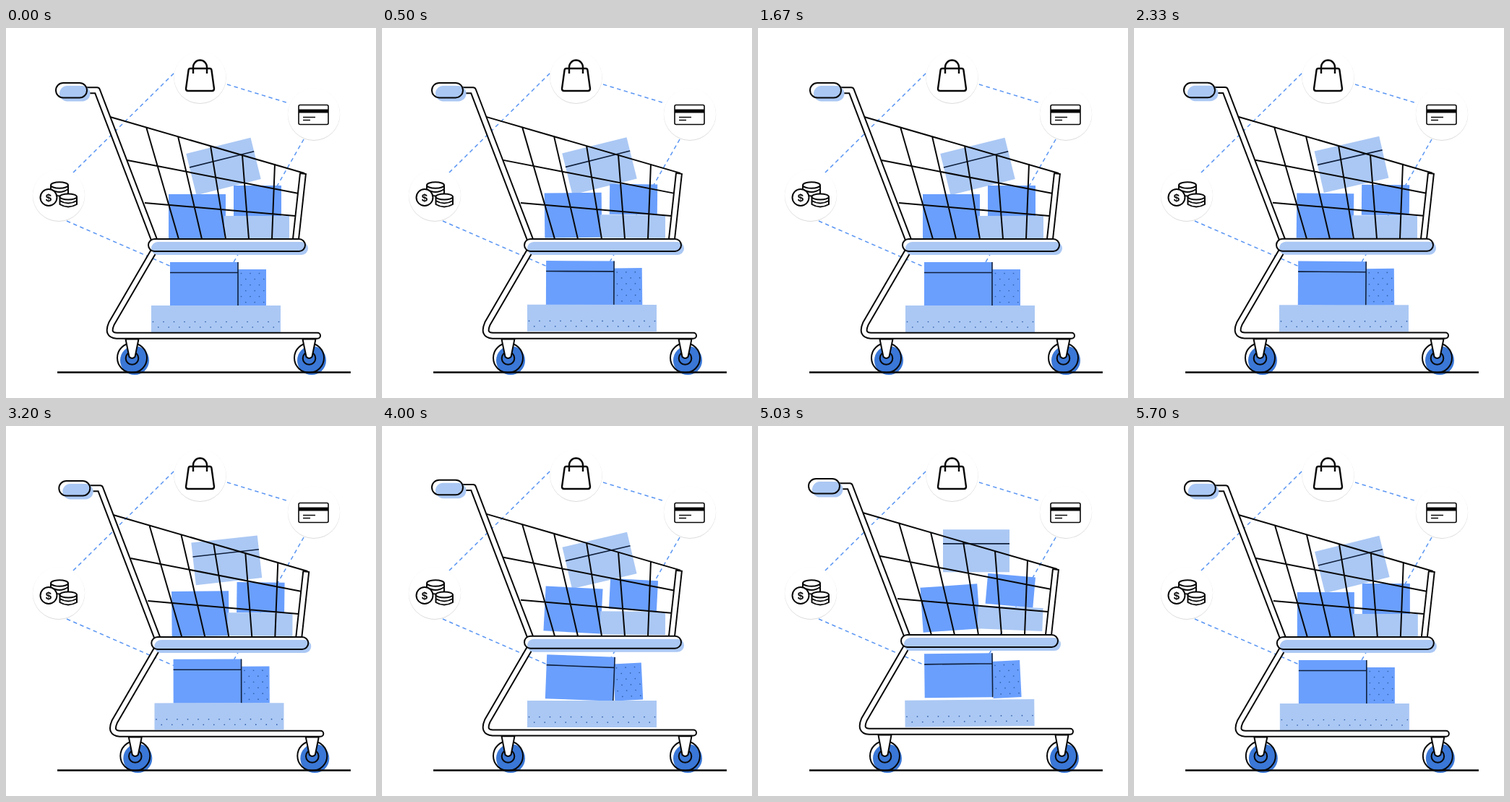
Recreate the animation shown at these times as an HTML page. Size 512 by 512 pixels, loop 5.73 s.

```html
<!DOCTYPE html>
<html lang="en">
<head>
<meta charset="utf-8">
<title>Shopping cart</title>
<style>
  html, body { margin: 0; width: 100%; height: 100%; overflow: hidden; background: #fff; }
  svg { display: block; width: 100vw; height: 100vh; fill: none; stroke-linejoin: round; }
  .ink { stroke: #080808; stroke-width: 2; }
  .thin { stroke: #10203c; stroke-width: 1.6; }
  .dots { stroke: #2f5fa8; stroke-width: 1.7; stroke-linecap: round; }
  .light { fill: #abc8f4; }
  .mid { fill: #6a9ffd; }
  .dark { fill: #3a77d6; }
  .white { fill: #fff; }
  .outer { stroke: #080808; stroke-width: 10; }
  .inner { stroke: #fff; stroke-width: 6; }
  .dash { stroke: #5b96f3; stroke-width: 1.5; stroke-dasharray: 5.5 4.5; }
  text { font: bold 15px "Liberation Sans", Arial, sans-serif; fill: #080808; text-anchor: middle; }
</style>
</head>
<body>
<svg viewBox="0 0 512 512">
  <path class="dash" d="M93 200L233 62M306 78L391 104M412 154L303 345M84 267L240 335"/>

  <g id="badges"></g>
  <g class="ink">
    <path stroke-width="2.4" d="M255 56H282Q284 56 284.400 58L288 84Q288 87 285 87H252Q249 87 249 84L252.600 58Q253 56 255 56ZM259 63V54A9.500 9.500 0 0 1 278 54V63"/>
    <rect x="405" y="106.500" width="41" height="27" rx="2" style="stroke-width:1.6"/>
    <path style="stroke-width:5" d="M405 115H446"/>
    <path style="stroke-width:1.6" d="M411 123.500H428M411 127.500H421"/>
    <path class="white" d="M62 218V229Q74 236 86 229V218M62 223Q74 231 86 223"/>
    <ellipse class="white" cx="74" cy="217.500" rx="12" ry="4.300"/>
    <path class="white" d="M74.500 234V244Q86 251 98 244V234M74.500 239Q86 246 98 239"/>
    <ellipse class="white" cx="86.200" cy="233.500" rx="11.800" ry="4"/>
    <circle class="white" cx="59" cy="234.500" r="11.500"/>
  </g>
  <text x="59" y="240">$</text>

  <g id="boxes"></g>

  <g id="wheels"></g>
  <path class="ink" style="stroke-width:2.5" d="M71 476.500H477"/>
  <g id="forks"></g>

  <g id="body">
    <path class="ink" d="M144 123L413 201M168 183L405 229M192 242L400 260M194 137L239 292M238 150L271 292M283 163L304 292M327 176L336 292M372 188L368 292"/>
    <g id="tubes"></g>
    <rect class="light" x="74" y="80" width="42.500" height="21.500" rx="10.700"/>
    <rect class="ink" x="69" y="76" width="43" height="20.500" rx="10.200"/>
    <rect class="white" x="197" y="292" width="217" height="17" rx="8.500"/>
    <rect class="light" x="201" y="296" width="217" height="18" rx="9"/>
    <rect class="ink" x="197" y="292" width="217" height="17" rx="8.500"/>
  </g>
</svg>
<script>
const LOOP = 5730, CYCLE = 48;
const $ = id => document.getElementById(id);

function add(parent, tag, attrs) {
  const el = document.createElementNS("http://www.w3.org/2000/svg", tag);
  for (const k in attrs) el.setAttribute(k, attrs[k]);
  return parent.appendChild(el);
}

for (const [cx, cy] of [[268.5, 68], [426, 119], [73, 231]]) {
  add($("badges"), "circle", { cx, cy: cy + 0.7, r: 36.2, fill: "#dcdcdc" });
  add($("badges"), "circle", { cx, cy, r: 36, fill: "#fff" });
}

const tubes = [
  ["M112 86.300H126L205 293", "butt"],
  ["M411 201L401 292", "butt"],
  ["M206 306L146 409Q139 425 153 425.800H431", "round"]
];
for (const [d, cap] of tubes) {
  add($("tubes"), "path", { d, class: "outer", "stroke-linecap": cap });
  add($("tubes"), "path", { d, class: "inner", "stroke-linecap": cap });
}
add($("tubes"), "path", { d: "M406.500 201L415.500 202", class: "ink" });

for (const x of [174.5, 419.5]) {
  const w = $("wheels");
  add(w, "circle", { cx: x, cy: 456.5, r: 20.5, class: "white" });
  add(w, "circle", { cx: x + 3.5, cy: 460, r: 20, class: "dark" });
  add(w, "circle", { cx: x, cy: 456.5, r: 20.5, class: "ink" });
  add(w, "circle", { cx: x, cy: 457, r: 8.8, class: "ink" });
}
const forks = [174.5, 419.5].map(x => [x, add($("forks"), "path", { class: "ink white" })]);

// Staggered dots in a box-centred coordinate system.
function dotRows(x0, x1, ys, gap) {
  let d = "";
  ys.forEach((y, i) => {
    for (let x = x0 + (i % 2) * gap / 2; x < x1; x += gap) d += `M${x} ${y}h.01`;
  });
  return d;
}

// lift and turn hold one amplitude per bump; slide is the drift in the last one.
const boxes = [
  { x: 301, y: 191.5, w: 92, h: 59, fill: "light", lines: "M-46 -10H46", rest: -14, lag: 0.4, spin: 1.1,
    lift: [8.7, 13, 19], turn: [2, 5, 14], slide: 0 },
  { x: 264.5, y: 261, w: 79, h: 62, fill: "mid", lift: [8.7, 9, 9.5], turn: [4, -3, -4.2], slide: 0.5 },
  { x: 348, y: 239, w: 66, h: 42, fill: "mid", lift: [7.3, 9, 12], turn: [4, 3, 5.3], slide: 0.3 },
  { x: 347, y: 276, w: 90, h: 32, fill: "light", lift: [4.5, 7, 10.5], turn: [0.6, 1.5, 2.5], slide: 1 },
  { x: 340.5, y: 359.5, w: 39, h: 51, fill: "mid", dots: dotRows(-15, 19, [-20, -12, -4, 4, 12, 20], 12.5),
    lift: [7.3, 8, 9.5], turn: [-3.8, -3, -3], slide: 2.5 },
  { x: 274, y: 354.5, w: 94, h: 61, fill: "mid", lines: "M-47 -16H47M47 -30.500V30.500",
    lift: [8, 8.5, 9.7], turn: [3, 1, -0.7], slide: 2.5 },
  { x: 290.5, y: 402.5, w: 179, h: 37, fill: "light", dots: dotRows(-87, 88, [4, 11.5], 14.5),
    lift: [5.3, 5.3, 5.4], turn: [0, 0.3, -0.6], slide: 1.5 }
];
for (const b of boxes) {
  b.el = add($("boxes"), "g", {});
  add(b.el, "rect", { x: -b.w / 2, y: -b.h / 2, width: b.w, height: b.h, class: b.fill });
  if (b.dots) add(b.el, "path", { d: b.dots, class: "dots" });
  if (b.lines) add(b.el, "path", { d: b.lines, class: "thin" });
}

const hops = [[2, 6, 10.3], [11.5, 16, 21], [21.5, 28, 32.3]];
const jolts = [[6.4, 3], [16, 4], [27, 5]];
const roll = [[0, 0], [28, 0], [29, 1], [30, 2], [32, 4.3], [34, 5], [41, 3], [48, 0]];

function hop(f, [start, peak, end]) {
  const u = (f - peak) / (f < peak ? peak - start : end - peak);
  return Math.max(0, 1 - u * u);
}
const hopSum = (f, amps) => amps.reduce((s, a, i) => s + a * hop(f, hops[i]), 0);

function cartLift(f) {
  return jolts.reduce((s, [mid, h]) => {
    const u = Math.abs(f - mid) / 4.5;
    return s + (u < 1 ? h * Math.cos(u * Math.PI / 2) ** 2 : 0);
  }, 0);
}

function along(keys, f) {
  const i = keys.findIndex(k => k[0] > f);
  const [a, va] = keys[i - 1], [b, vb] = keys[i];
  return va + (vb - va) * (f - a) / (b - a);
}

function draw(t) {
  // 25 poses per second shown on a 30 Hz clock
  const tick = Math.floor(t * 0.03 + 0.2);
  const f = Math.floor(tick * 5 / 6) % CYCLE;
  const x = along(roll, f), y = -cartLift(f);

  $("body").setAttribute("transform", `translate(${x} ${y})`);
  for (const id of ["wheels", "forks"]) $(id).setAttribute("transform", `translate(${x} 0)`);
  for (const [cx, el] of forks) {
    const top = 430.5 + y;
    el.setAttribute("d", `M${cx - 9} ${top}H${cx + 9}L${cx + 4} 455Q${cx} 459 ${cx - 4} 455Z`);
  }
  for (const b of boxes) {
    const bx = b.x + x + b.slide * hop(f, hops[2]);
    const by = b.y - hopSum(f - (b.lag || 0), b.lift);
    const turn = (b.rest || 0) + hopSum(f - (b.spin || 0), b.turn);
    b.el.setAttribute("transform", `translate(${bx} ${by}) rotate(${turn})`);
  }
}

function loop() {
  draw(performance.now() % LOOP);
  requestAnimationFrame(loop);
}
loop();
</script>
</body>
</html>
```
